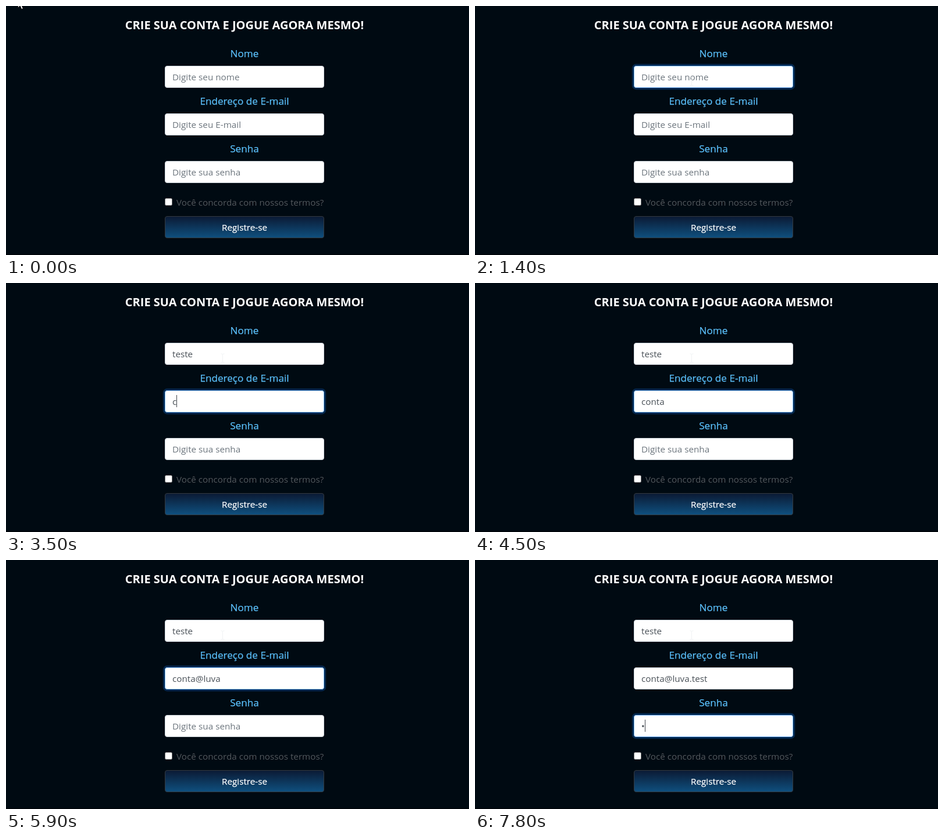
Recreate the animation shown at these times as an HTML page. Size 796 by 429 pixels, loop 8 s.

```html
<!DOCTYPE html>
<html lang="pt-BR">
<head>
<meta charset="utf-8">
<title>Cadastro</title>
<style>
  html, body { margin: 0; width: 100%; height: 100%; overflow: hidden; background: #000a12; }
  svg { display: block; font: 15.25px "Open Sans", "Noto Sans", sans-serif; }
  .mid { text-anchor: middle; }
  .title { font-size: 20.03px; font-weight: 700; fill: #fff; }
  .label { font-size: 17.15px; fill: #5bc0fb; stroke: #5bc0fb; stroke-width: .25px; }
  .button { fill: #fff; stroke: #fff; stroke-width: .25px; }
  .box { fill: #fff; stroke: #ced4da; }
  .focus { fill: none; }
  .hint { fill: #6c757d; }
  .value { fill: #495057; }
</style>
</head>
<body>
<svg id="stage" width="796" height="429" viewBox="0 0 796 429">
  <defs>
    <linearGradient id="blue" x2="0" y2="1">
      <stop stop-color="#0b1a34"/>
      <stop offset="1" stop-color="#0f507f"/>
    </linearGradient>
  </defs>
  <rect y="427" width="796" height="2" fill="#01060b"/>
  <text class="mid title" x="410" y="40">CRIE SUA CONTA E JOGUE AGORA MESMO!</text>
  <g id="fields"></g>
  <rect x="273.5" y="331.5" width="12" height="12" rx="2" fill="#fff" stroke="#767676"/>
  <text x="293" y="344" fill="#53585d">Você concorda com nossos termos?</text>
  <rect x="273.5" y="362.5" width="273" height="37" rx="3.5" fill="url(#blue)" stroke="#343a40"/>
  <text class="mid button" x="410" y="387">Registre-se</text>
  <rect id="caret" width="1" height="21" fill="#40464c"/>
  <path id="arrow" d="M0 0V16L3.7 12.6L6.3 18.5L8.8 17.4L6.3 11.7H11.3Z" fill="#fff" stroke="#000" stroke-width=".8"/>
  <path id="beam" d="M-3 -7.5H-1L0 -6.5L1 -7.5H3M0 -6.5V6.5M-3 7.5H-1L0 6.5L1 7.5H3" fill="none" stroke="#f0f2f4"/>
</svg>
<script>
const LOOP = 8000, STEP = 100;
const $ = id => document.getElementById(id);
const clamp = v => Math.max(0, Math.min(1, v));

// Each field: label, placeholder, time span of its focus ring
const fields = [
  ['Nome', 'Digite seu nome', 900, 2800],
  ['Endereço de E-mail', 'Digite seu E-mail', 2800, 7100],
  ['Senha', 'Digite sua senha', 7100, 8200]
].map(([label, hint, start, end], i) => {
  const y = 103 + i * 82;
  const g = document.createElementNS('http://www.w3.org/2000/svg', 'g');
  g.innerHTML = `
    <text class="mid label" x="410" y="${y - 15}">${label}</text>
    <rect class="box" x="273.5" y="${y + .5}" width="273" height="37" rx="3.5"/>
    <g class="focus">
      <rect x="271.4" y="${y - 1.6}" width="277.2" height="41.2" rx="5.6"
        stroke="#007bff" stroke-opacity=".25" stroke-width="3.2"/>
      <rect x="273.5" y="${y + .5}" width="273" height="37" rx="3.5" stroke="#80bdff"/>
    </g>
    <text class="hint" x="286" y="${y + 25}">${hint}</text>
    <text class="value" x="286" y="${y + 25}"></text>`;
  $('fields').append(g);
  const find = name => g.querySelector('.' + name);
  return { y, start, end, ring: find('focus'), hint: find('hint'), value: find('value') };
});

// [time, field, typed characters]; null hides the caret
const keys = [
  [900, 0, ''], [1400, 0, null],
  [1800, 0, 't'], [1900, 0, 'e'], [2200, 0, 'st'], [2400, 0, 'e'],
  [2700, 1, ''], [3300, 1, null],
  [3500, 1, 'c'], [3600, 1, 'o'], [3700, 1, 'n'], [3900, 1, 't'], [4000, 1, 'a'], [4500, 1, null],
  [4600, 1, '@'], [4900, 1, 'l'], [5000, 1, 'u'], [5200, 1, 'v'], [5400, 1, 'a'], [5900, 1, null],
  [6400, 1, '.'], [6500, 1, 'te'], [6700, 1, 's'], [6900, 1, 't'],
  [7000, 2, ''], [7400, 2, null], [7800, 2, '•']
];

const place = (el, x, y, visible) => {
  el.setAttribute('transform', `translate(${x} ${y})`);
  el.setAttribute('visibility', visible ? 'visible' : 'hidden');
};

function draw(t) {
  const texts = ['', '', ''];
  let active = null;
  for (const [time, field, chars] of keys) {
    if (time > t) break;
    texts[field] += chars ?? '';
    active = chars === null ? null : field;
  }
  fields.forEach((f, i) => {
    f.value.textContent = texts[i];
    f.hint.setAttribute('visibility', texts[i] ? 'hidden' : 'visible');
    f.ring.setAttribute('opacity', t < f.start ? 0 : clamp((f.end - t) / 150));
  });

  const f = fields[active ?? 0];
  place($('caret'), 286 + Math.round(f.value.getComputedTextLength()), f.y + 8, active !== null);

  const p = clamp((t - 100) / 800), ease = p * p * (3 - 2 * p);
  const x = 20.5 + 352 * ease, y = -13 + 142.5 * ease;
  const inside = x > 273 && y > 103;
  place($('arrow'), x, y, !inside);
  place($('beam'), x, y, inside);
}

function tick() {
  draw(Math.floor(performance.now() % LOOP / STEP) * STEP);
  requestAnimationFrame(tick);
}
tick();
</script>
</body>
</html>
```
